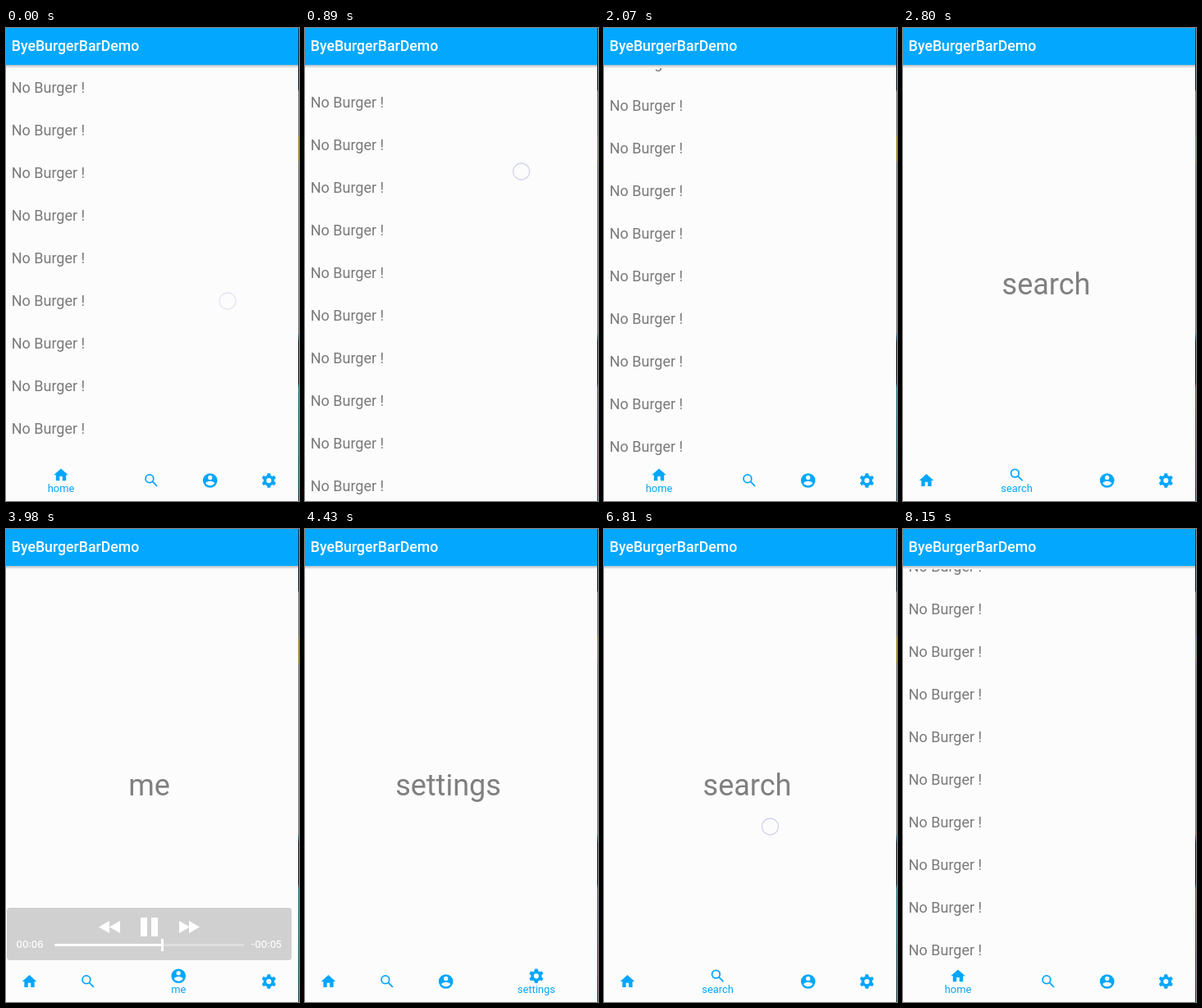
An HTML page that plays this animation: 357x577 px, repeating every 8250 ms.

```html
<!DOCTYPE html>
<html lang="en">
<head>
<meta charset="utf-8">
<title>ByeBurgerBarDemo</title>
<style>
  html, body { margin: 0; width: 100%; height: 100%; overflow: hidden; background: #fcfcfc; }
  svg { display: block; width: 357px; height: 577px; font-family: Roboto, sans-serif; }
  .row { font-size: 18px; fill: #7a7a7a; }
  .page { font-size: 36px; fill: #808080; text-anchor: middle; }
  .label { font-size: 12.9px; text-anchor: middle; }
  .clock { font: 500 11.5px Inter, sans-serif; }
</style>
</head>
<body>
<svg viewBox="0 0 357 577">
  <defs>
    <linearGradient id="shade" x2="0" y2="1">
      <stop stop-color="#b4bcc4"/><stop offset="1" stop-color="#fcfcfc"/>
    </linearGradient>
    <linearGradient id="edge" x2="0" y2="1">
      <stop stop-color="#123a58"/><stop offset=".08" stop-color="#10202c"/>
      <stop offset=".13" stop-color="#10202c"/><stop offset=".135" stop-color="#777"/>
      <stop offset=".225" stop-color="#777"/><stop offset=".23" stop-color="#a8892c"/>
      <stop offset=".28" stop-color="#a8892c"/><stop offset=".285" stop-color="#777"/>
      <stop offset=".645" stop-color="#777"/><stop offset=".65" stop-color="#1f6f8a"/>
      <stop offset=".665" stop-color="#0c1418"/><stop offset=".75" stop-color="#0c1418"/>
      <stop offset=".76" stop-color="#2a7288"/><stop offset="1" stop-color="#1c4656"/>
    </linearGradient>
  </defs>
  <rect width="357" height="577" fill="#fcfcfc"/>
  <g id="list"></g>
  <g id="pages"></g>
  <g id="nav" fill="#03a6fc">
    <rect y="528" width="357" height="49" fill="#fcfcfc"/>
  </g>
  <g id="player" fill="#fff">
    <rect x="1" y="462" width="347" height="64" rx="4" fill="#d0d0d0"/>
    <path d="M126 478v15l-13-7.500zM139 478v15l-13-7.500zM211 478v15l13-7.500zM223 478v15l13-7.500z"/>
    <path d="M164 474h8v23h-8zM177 474h8v23h-8z"/>
    <path d="M59 506h231v3H59z" fill="#dedede"/>
    <path d="M59 506h130v3H59zM189 500h3v15h-3z"/>
    <text class="clock" x="12.500" y="511">00:06</text>
    <text class="clock" x="336" y="511" text-anchor="end">-00:05</text>
  </g>
  <rect y="45" width="357" height="4" fill="url(#shade)"/>
  <rect width="357" height="45" fill="#03a8fe"/>
  <text x="6.800" y="28" font-size="17.700" font-weight="500" fill="#fff">ByeBurgerBarDemo</text>
  <circle id="touch" r="10" fill="none" stroke="#d3d5ea" stroke-width="1.300"/>
  <rect x="356" width="1" height="577" fill="url(#edge)"/>
</svg>
<script>
const LOOP = 8250, ROW = 52, SMALL = 71.6, LARGE = 148.6;
const $ = id => document.getElementById(id);

function add(parent, tag, attrs, html = '') {
  const node = document.createElementNS('http://www.w3.org/2000/svg', tag);
  for (const key in attrs) node.setAttribute(key, attrs[key]);
  node.innerHTML = html;
  return parent.appendChild(node);
}

// Icons on a 24-unit grid centred on the origin
const teeth = [0, 60, 120, 180, 240, 300].map(a =>
  `<path d="M-2.9-6 -2-10H2L2.900-6z" transform="rotate(${a})"/>`).join('');
const tabs = [
  { name: 'home', icon: '<path d="M-2 8V2h4v6h5V0h3L0-9-10 0h3v8z"/>' },
  { name: 'search', icon: '<g fill="none" stroke="#03a6fc" stroke-width="2"><circle cx="-2.5" cy="-2.5" r="5.500"/><path d="M1.600 1.600 7.800 7.800"/></g>' },
  { name: 'me', icon: '<circle r="10"/><g fill="#fcfcfc"><circle cy="-4" r="3"/><path d="M0 7.200C-2.500 7.200-4.700 5.900-6 4-6 2-2 .9 0 .9S6 2 6 4C4.700 5.900 2.500 7.200 0 7.200z"/></g>' },
  { name: 'settings', icon: `<circle r="5.500" fill="none" stroke="#03a6fc" stroke-width="4"/>${teeth}` }
];
for (const tab of tabs) {
  tab.glyph = add($('nav'), 'g', {}, tab.icon);
  tab.label = add($('nav'), 'text', { class: 'label', y: 566 }, tab.name);
  if (tab.name !== 'home') tab.page = add($('pages'), 'text', { class: 'page', x: 174.5, y: 325 }, tab.name);
}
for (let i = 0; i < 16; i++) add($('list'), 'text', { class: 'row', x: 6.7, y: 78.5 + i * ROW }, 'No Burger !');

const steps = [
  [0, 140, 2], [440, 1480, 8], [1630, 2220, 5], [2510, 2800, 3], [3250, 3400, 2], [3690, 3690, 1],
  [3980, 4430, 4], [4720, 5170, 4], [5770, 6060, 3], [6510, 7400, 7], [7850, 8150, 3]
].flatMap(([a, b, n]) => Array.from({ length: n }, (_, i) =>
  n > 1 ? Math.round((a + (b - a) * i / (n - 1)) / 10) * 10 : a));

const switches = [[-1000, 0], [2510, 1], [3250, 2], [4130, 3], [4720, 0], [5770, 1], [7850, 0]];
const tracks = {
  scroll: [[290, 0], [890, 190], [1180, 234], [1480, 234], [1630, 222], [2070, 82], [2220, 78.5]],
  drop: [[440, 0], [740, 49], [1630, 49], [2070, 0]],
  x: [[290, 270], [1040, 262], [1330, 254], [2220, 256], [6510, 201], [6810, 202.5], [7100, 197]],
  y: [[290, 333], [890, 175], [1180, 145], [1330, 334], [1480, 334], [2070, 486], [6510, 393], [6660, 385], [6810, 363], [7100, 290], [7250, 283]],
  touch: [[0, .6], [140, 1], [1040, 1], [1180, 0], [1330, 0], [1480, 1], [1930, 1], [2070, 0], [6360, 0], [6510, .7], [6660, 1], [7100, 1], [7400, 0]],
  player: [[3690, 0], [3970, 0], [3980, 1], [4130, .5], [4280, 0]]
};

function value(points, t) {
  const i = points.findIndex(p => p[0] > t);
  if (i < 0) return points[points.length - 1][1];
  if (i === 0) return points[0][1];
  const [t0, v0] = points[i - 1], [t1, v1] = points[i];
  return v0 + (v1 - v0) * (t - t0) / (t1 - t0);
}
const last = (items, test) => items.filter(test).pop();

function drawTabs(t) {
  const current = last(switches, s => s[0] <= t);
  const previous = switches[switches.indexOf(current) - 1] || current;
  const u = Math.min(1, (t - current[0] + 80) / 300);
  const p = u * u * (3 - 2 * u);
  let left = -7.3;
  tabs.forEach((tab, i) => {
    const w = (i === current[1] ? p : 0) + (i === previous[1] ? 1 - p : 0);
    const width = SMALL + (LARGE - SMALL) * w;
    const x = left + width / 2;
    left += width;
    tab.glyph.setAttribute('transform', `translate(${x} ${552 - 6.7 * w}) scale(.88)`);
    tab.label.setAttribute('x', x);
    tab.label.setAttribute('opacity', w);
    if (tab.page) tab.page.setAttribute('opacity', i === current[1] ? 1 : 0);
  });
  $('list').setAttribute('opacity', current[1] === 0 ? 1 : 0);
}

function draw(time) {
  const t = last(steps, s => s <= time);
  const at = name => value(tracks[name], t);
  const scroll = at('scroll');
  drawTabs(t);
  $('list').setAttribute('transform', `translate(0 ${-scroll})`);
  $('nav').setAttribute('transform', `translate(0 ${at('drop')})`);
  $('touch').setAttribute('transform', `translate(${at('x')} ${at('y')})`);
  $('touch').setAttribute('opacity', at('touch'));
  $('player').setAttribute('opacity', at('player'));
}

const start = performance.now();
function tick() {
  draw((performance.now() - start) % LOOP);
  requestAnimationFrame(tick);
}
tick();
</script>
</body>
</html>
```
